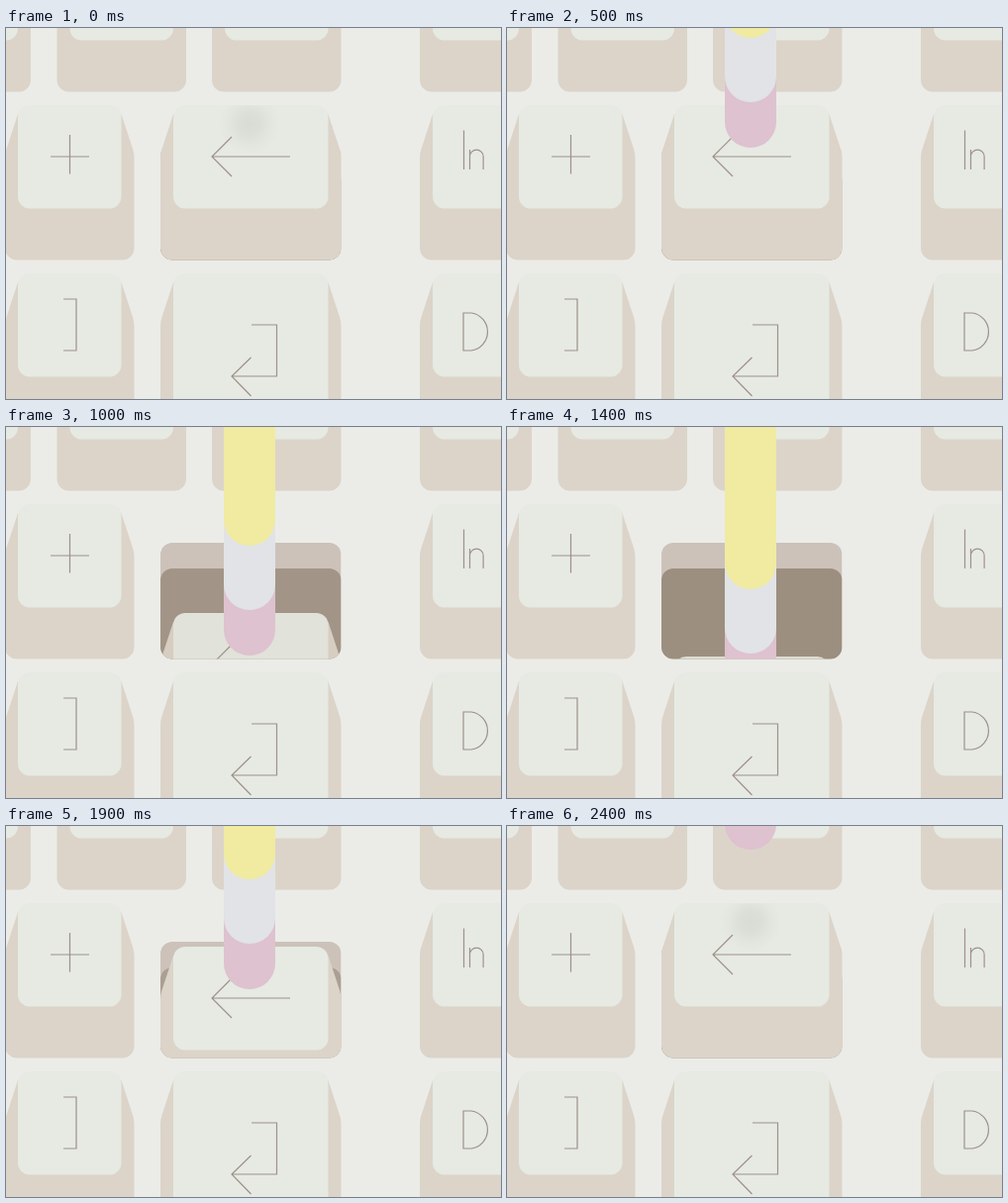
Write an HTML page that moves like this. It is 500 px wide and 375 px high and loops after 2500 ms.

```html
<!DOCTYPE html>
<html lang="en">
<head>
<meta charset="utf-8">
<title>Key press</title>
<style>
  html, body { margin: 0; width: 100%; height: 100%; overflow: hidden; background: #ebece8; }
  svg { display: block; width: 100vw; height: 100vh; }
  .side { fill: #dcd4c9; }
  .face { fill: #e6eae3; }
  .sign { fill: none; stroke: #9f9189; stroke-width: 1.2; }
</style>
</head>
<body>
<svg viewBox="0 0 500 375">
  <defs>
    <clipPath id="slot"><path d="M156 0H338.5V222.5a12 12 0 0 1-12 12H168a12 12 0 0 1-12-12Z"/></clipPath>
    <clipPath id="top"><rect x="169" y="78" width="156.5" height="104.5" rx="12"/></clipPath>
    <radialGradient id="soft">
      <stop offset="0" stop-color="#d8dcd5"/>
      <stop offset=".35" stop-color="#d8dcd5" stop-opacity=".8"/>
      <stop offset=".7" stop-color="#d8dcd5" stop-opacity=".28"/>
      <stop offset="1" stop-color="#d8dcd5" stop-opacity="0"/>
    </radialGradient>
  </defs>
  <g id="board"></g>
  <g clip-path="url(#slot)">
    <rect x="156" y="117" width="182.5" height="117.5" rx="12" fill="#ccc2ba"/>
    <rect id="pit" x="156" y="143" width="182.5" height="110" rx="12"/>
    <g id="key"></g>
    <g id="pencil">
      <rect x="220" y="-500" width="52" height="500" rx="26" fill="#dec2cf"/>
      <rect x="220" y="-546" width="52" height="500" rx="26" fill="#e1e3e6"/>
      <rect x="220" y="-611" width="52" height="500" rx="26" fill="#f0eba1"/>
    </g>
  </g>
</svg>
<script>
const $ = id => document.getElementById(id);
const LOOP = 2500, STEP = 100, PEAK = 1300;
const TOUCH_TIP = 121, TOUCH_TIME = 500;

function keycap(x, y, w = 104.5, h = 104.5) {
  const l = x - 13, r = x + w + 13, b = y + h + 52;
  return `<path class="side" d="M${x} ${y + 9}L${l + 1.2} ${y + 45}Q${l} ${y + 49} ${l} ${y + 53}
    V${b - 12}a12 12 0 0 0 12 12H${r - 12}a12 12 0 0 0 12-12V${y + 53}
    Q${r} ${y + 49} ${r - 1.2} ${y + 45}L${x + w} ${y + 9}Z"/>
    <rect class="face" x="${x}" y="${y}" width="${w}" height="${h}" rx="12"/>`;
}

const sign = d => `<path class="sign" d="${d}"/>`;

$("board").innerHTML =
  [-92.5, 64.5, 221, 431].map(x => keycap(x, -92)).join("") +
  keycap(12, 78) + sign("M45 130H84M64.5 108V147.500") +
  keycap(431, 78) + sign("M462.500 103.500V143M468.500 123V143M468.500 130a6.800 6.800 0 0 1 13.600 0V143") +
  keycap(12, 248) + sign("M58 274H71V326H58") +
  keycap(169, 248, 156.5, 250) + sign("M248 300H273.500V352H228M247.500 333L228 352L247.500 372") +
  keycap(431, 248) + sign("M462 288H470a19.200 19.200 0 0 1 0 38H462Z");

$("key").innerHTML = keycap(169, 78, 156.5) +
  `<g clip-path="url(#top)"><circle id="shadow" cx="246" cy="97" fill="url(#soft)"/></g>` +
  sign("M287 130H208M228 110L208 130L228 150");

const side = $("key").querySelector(".side");
const face = $("key").querySelector(".face");
const clamp = v => Math.min(1, Math.max(0, v));
const blend = (a, b, t) => `rgb(${a.map((v, i) => Math.round(v + (b[i] - v) * t))})`;

function draw(ms) {
  const now = Math.floor((ms % LOOP) / STEP) * STEP;
  // The way up mirrors the way down.
  const steps = (PEAK - Math.abs(now - PEAK) - TOUCH_TIME) / STEP;
  const tip = TOUCH_TIP + steps * (steps < 0 ? 97 / 3 : 22);
  const depth = Math.max(0, tip - TOUCH_TIP);
  const shade = clamp((depth - 44) / 110);

  $("pencil").setAttribute("transform", `translate(0 ${tip})`);
  $("key").setAttribute("transform", `translate(0 ${depth})`);
  $("pit").setAttribute("fill", blend([171, 159, 147], [156, 143, 127], shade));
  face.style.fill = blend([230, 234, 227], [222, 220, 210], shade);
  side.style.fill = blend([220, 212, 201], [211, 201, 188], shade);
  $("shadow").setAttribute("r", 31 - 7 * clamp((tip - 24) / 97));
}

const start = performance.now();
function tick() {
  draw(performance.now() - start);
  requestAnimationFrame(tick);
}
tick();
</script>
</body>
</html>
```
